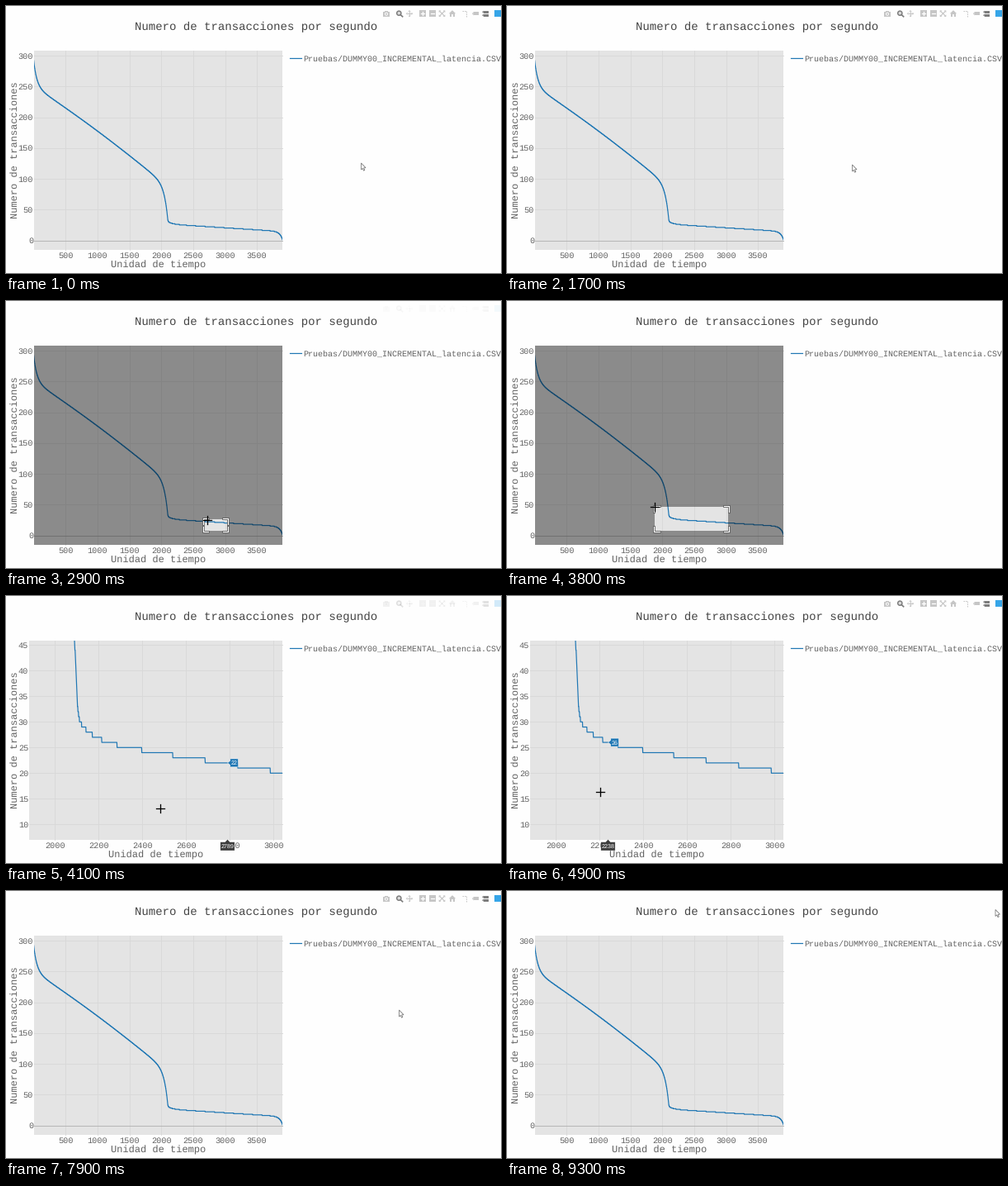
Recreate the animation shown at these times as a matplotlib script. Size 600 by 323 pixels, loop 9.4 s.

```python
import numpy as np
import matplotlib.pyplot as plt
from matplotlib.animation import FuncAnimation
from matplotlib.collections import PolyCollection
from matplotlib.patches import Circle, PathPatch, Polygon, Rectangle
from matplotlib.path import Path

W, H, DPI = 600, 323, 100
STEP, FRAMES = 100, 94
PT = 72 / DPI
TOP, BOTTOM, RIGHT = 53.5, 294.5, 335
BLUE, INK, SOFT = "#1f77b4", "#444444", "#626262"
PALE, DARK = "#c6c6c6", "#7d7d7d"
PRESS, RELEASE, RESET = 2700, 4000, 6700

plt.rcParams["text.hinting"] = "none"
fig = plt.figure(figsize=(W / DPI, H / DPI), dpi=DPI, facecolor="#fefefe")
ax = fig.add_axes([0, 0, 1, 1])
ax.set(xlim=(0, W), ylim=(H, 0))
ax.axis("off")


def text(x, y, s, size, ha="center", color=SOFT, font="Liberation Mono", z=3, **kw):
    return ax.text(x, y, s, fontsize=size * PT, family=font, color=color,
                   ha=ha, va="baseline", zorder=z, **kw)


def line(xs, ys, color, width, z=2, **kw):
    return ax.plot(xs, ys, color=color, lw=width * PT, zorder=z, **kw)[0]


def rect(x, y, w, h, color, z=1):
    return ax.add_patch(Rectangle((x, y), w, h, fc=color, ec="none", zorder=z))


def disc(x, y, r, color, z=2, edge="none", width=0):
    return ax.add_patch(Circle((x, y), r, fc=color, ec=edge, lw=width * PT, zorder=z))


def poly(points, color, z=2, edge="none", width=0):
    return ax.add_patch(Polygon(points, closed=True, fc=color, ec=edge,
                                lw=width * PT, zorder=z))


def throughput(x):
    """Sorted rate: long descent, cliff at 2104, slow tail, final drop."""
    slope = (250.6 - 0.0772 * x + 4 * np.sin(np.pi * x / 2000)
             + 41 * np.exp(-x / 50) - 57 * np.exp((x - 2105) / 55))
    d = np.maximum(x - 2104, 0)
    tail = (26.4 - 0.0067 * d + 4 * np.exp(-d / 70) + 2.5 * np.exp(-d / 5)
            - 13 * np.exp((x - 3901) / 45))
    return np.round(np.where(x < 2104, slope, tail))


DATA_X = np.arange(3902)
DATA_Y = throughput(DATA_X)


class View:
    """One zoom level of the chart, placed in stage pixels."""

    def __init__(self, left, x0, kx, y0, ky, xticks, yticks):
        self.x0, self.kx, self.y0, self.ky = x0, kx, y0, ky
        back = rect(left, TOP, RIGHT - left, BOTTOM - TOP, "#e4e4e4", 0)
        self.parts = [back]
        for v in xticks:
            x = self.px(v)
            self.parts += [line([x, x], [TOP, BOTTOM], "#d8d8d8", 0.9, 1),
                           text(x, 305.2, str(v), 10.2)]
        for v in yticks:
            y = self.py(v)
            tone = "#b2b2b2" if v == 0 else "#d8d8d8"
            self.parts += [line([left, RIGHT], [y, y], tone, 0.9, 1),
                           text(left - 0.4, y + 3.6, str(v), 10.2, "right")]
        curve = line(self.px(DATA_X), self.py(DATA_Y), BLUE, 1.2)
        curve.set_clip_path(back)
        mid = (left + RIGHT) / 2
        self.parts += [curve, text(mid, 317, "Unidad de tiempo", 12)]

    def px(self, v):
        return self.x0 + self.kx * v

    def py(self, v):
        return self.y0 - self.ky * v

    def sample(self, x):
        i = int(np.clip(round((x - self.x0) / self.kx), 0, DATA_X[-1]))
        return i, int(DATA_Y[i])

    def show(self, on):
        for p in self.parts:
            p.set_visible(on)


full = View(33.5, 33.6, 0.0773, 283.5, 0.745,
            range(500, 3501, 500), range(0, 301, 50))
zoom = View(27.5, 59.4 - 2000 * 0.265, 0.265, 59.3 + 45 * 6.2, 6.2,
            range(2000, 3001, 200), range(10, 46, 5))

text(303.5, 28.6, "Numero de transacciones por segundo", 14, color=INK)
text(13.8, 174, "Numero de transacciones", 12, rotation=90, rotation_mode="anchor")
line([344, 358], [63.3, 63.3], BLUE, 1.2)
text(360.6, 67, "Pruebas/DUMMY00_INCREMENTAL_latencia.CSV", 10, "left")


def toolbar(y=9.2):
    # camera and magnifier
    icons = [rect(457, y - 2.4, 8, 5.8, PALE), rect(459.3, y - 3.6, 3.4, 2, PALE),
             disc(461, y + 0.5, 2, "white"), disc(461, y + 0.5, 1.1, PALE, 3),
             disc(476.3, y - 0.5, 2.6, "#dddddd", 2, DARK, 1.5),
             line([478.2, 480.6], [y + 1.4, y + 3.6], DARK, 1.7)]
    # pan
    for dx, dy in ((1, 0), (-1, 0), (0, 1), (0, -1)):
        mid, way, side = np.array([489, y]), np.array([dx, dy]), np.array([dy, dx])
        neck = mid + 2.4 * way
        icons += [line(*np.transpose([mid, neck]), PALE, 1),
                  poly([mid + 4.3 * way, neck + 1.6 * side, neck - 1.6 * side], PALE)]
    # zoom in, zoom out
    for x in (505, 517):
        icons += [rect(x - 3.8, y - 3.8, 7.6, 7.6, PALE),
                  line([x - 2.2, x + 2.2], [y, y], "white", 1.3)]
    icons.append(line([505, 505], [y - 2.2, y + 2.2], "white", 1.3))
    # autoscale
    for sx in (-1, 1):
        for sy in (-1, 1):
            cx, cy = 528.5 + 3.8 * sx, y + 3.8 * sy
            icons += [line([528.5, cx - sx], [y, cy - sy], PALE, 1.1),
                      poly([(cx, cy), (cx - 2.6 * sx, cy), (cx, cy - 2.6 * sy)], PALE)]
    # home
    icons += [poly([(541, y - 4), (545.2, y), (536.8, y)], PALE),
              rect(538, y, 2.1, 3.6, PALE), rect(541.9, y, 2.1, 3.6, PALE),
              rect(538, y, 6, 1.1, PALE)]
    # spike lines
    icons.append(line([552.5, 558, 558], [y - 2.8, y - 2.8, y + 3.6], PALE, 1,
                      ls=(0, (1.6, 1))))
    # hover modes
    for x, cy, h, tone in ((565, y, 2.3, PALE), (577, y - 2, 1.5, DARK),
                           (577, y + 2, 1.5, DARK)):
        icons += [poly([(x, cy), (x + 1.8, cy - h), (x + 1.8, cy + h)], tone),
                  rect(x + 1.8, cy - h, 6.4, 2 * h, tone)]
    icons.append(rect(592, 5, 8, 8, "#36a5e8"))
    return icons


icons = toolbar()

# Hover labels: value tag on the curve and position tag on the axis.
tag = poly([(0, 0)] * 3, BLUE, 6, "white", 0.5)
tag_text = text(0, 0, "", 7.2, color="white", font="Liberation Sans", z=7)
axis_tag = poly([(0, 0)] * 3, "#3c3c3c", 6, "white", 0.3)
axis_text = text(0, 0, "", 7.2, color="white", font="Liberation Sans", z=7)
hover = [tag, tag_text, axis_tag, axis_text]

shade = ax.add_patch(PathPatch(Path([(0, 0), (1, 1)]), fc=(0, 0, 0, 0.39),
                               ec="none", zorder=4))
corners = ax.add_collection(PolyCollection([], facecolors="white", edgecolors=INK,
                                           linewidths=0.7 * PT, zorder=5))

ARROW = np.array([(0, 0), (0, 8), (1.8, 6.4), (3, 9.2), (4.3, 8.6),
                  (3.1, 5.9), (5.5, 5.7)])
arrow = poly(ARROW, "white", 9, "#777777", 0.8)
cross = line([0], [0], "black", 1.3, 9)

# Pointer stops: time in ms, x, y.
STOPS = np.array([
    (1600, 430.5, 190), (1700, 418.5, 192), (2600, 268.4, 278),
    (PRESS, 268.4, 278), (2900, 243.7, 265), (3700, 179, 249),
    (RELEASE, 179, 249), (4100, 187, 256.6), (5100, 95, 232),
    (5800, 185.9, 241), (6300, 185.9, 241), (6400, 193, 242.6),
    (7600, 193, 242.6), (7900, 476.5, 144), (8600, 560, 38), (9300, 592, 22.5)]).T


def pointer(t):
    return np.array([np.interp(t, STOPS[0], axis) for axis in STOPS[1:]])


def ease(t, start, end):
    u = np.clip((t - start) / (end - start), 0, 1)
    return u * u * (3 - 2 * u)


def inside(x, y):
    return 28 < x < RIGHT and TOP < y < BOTTOM


def box(x0, y0, x1, y1):
    return [(x0, y0), (x1, y0), (x1, y1), (x0, y1), (x0, y0)]


def draw_hover(view, x):
    i, v = view.sample(x)
    x, y = view.px(i), view.py(v)
    left = x + 3.2
    right = left + 2 + 3.9 * len(str(v))
    tag.set_xy([(x, y), (left, y - 2.6), (left, y - 5), (right, y - 5),
                (right, y + 5), (left, y + 5), (left, y + 2.6)])
    tag_text.set_text(str(v))
    tag_text.set_position(((left + right) / 2, y + 2.6))
    w, top = 1 + 1.9 * len(str(i)), BOTTOM + 3.2
    axis_tag.set_xy([(x, BOTTOM), (x + 3, top), (x + w, top), (x + w, top + 10.3),
                     (x - w, top + 10.3), (x - w, top), (x - 3, top)])
    axis_text.set_text(str(i))
    axis_text.set_position((x, top + 7.7))


def draw_selection(t):
    ends = np.sort([pointer(PRESS), pointer(t + STEP / 2)], axis=0)
    (x0, y0), (x1, y1) = ends
    ring = box(33.5, TOP, RIGHT, BOTTOM) + box(x0, y0, x1, y1)[::-1]
    codes = ([Path.MOVETO] + [Path.LINETO] * 3 + [Path.CLOSEPOLY]) * 2
    shade.set_path(Path(ring, codes))
    a = min(x1 - x0, y1 - y0, 13) / 2
    shapes = []
    for x, sx in ((x0, -1), (x1, 1)):
        for y, sy in ((y0, -1), (y1, 1)):
            ox, oy, ix, iy = x + 2 * sx, y + 2 * sy, x - a * sx, y - a * sy
            shapes.append([(ox, oy), (ix, oy), (ix, y), (x, y), (x, iy), (ox, iy)])
    corners.set_verts(shapes)


def update(n):
    t = n * STEP
    x, y = pointer(t)
    zoomed = RELEASE <= t < RESET
    dragging = PRESS < t < RELEASE
    full.show(not zoomed)
    zoom.show(zoomed)

    over = inside(x, y)
    arrow.set_visible(not over)
    arrow.set_xy(ARROW + (x, y))
    cross.set_visible(over)
    cross.set_data([x - 5, x + 5, np.nan, x, x], [y, y, np.nan, y - 5, y + 5])

    shade.set_visible(dragging)
    corners.set_visible(dragging)
    if dragging:
        draw_selection(t)

    # Labels trail the pointer; after the zoom they reappear at the press point.
    hx, hy = pointer(PRESS if RELEASE <= t <= RELEASE + STEP else t - STEP)
    labelled = over and inside(hx, hy) and not dragging
    for h in hover:
        h.set_visible(labelled)
    if labelled:
        draw_hover(zoom if zoomed else full, hx)

    # The toolbar hides during the drag and when the pointer leaves.
    alpha = 1 - ease(t, 2600, 2950) + ease(t, RELEASE, 4330) - ease(t, 8600, 9000)
    for icon in icons:
        icon.set_alpha(float(np.clip(alpha, 0, 1)))
    return []


anim = FuncAnimation(fig, update, frames=FRAMES, interval=STEP,
                     init_func=lambda: update(0), repeat=True, repeat_delay=0)
plt.show()
```
